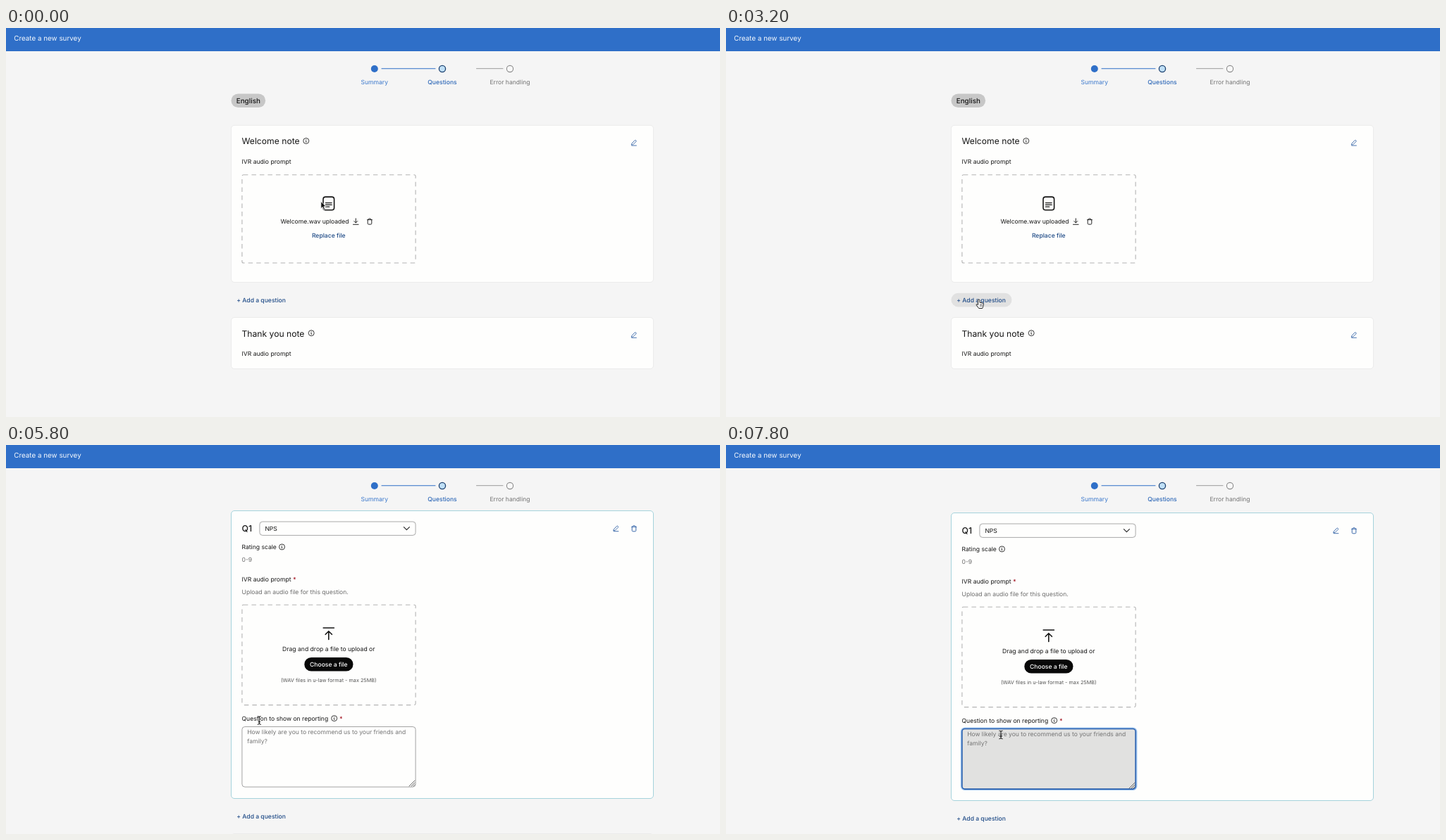
An HTML page that plays this animation: 1013x553 px, repeating every 8 s.

```html
<!DOCTYPE html>
<html lang="en">
<head>
<meta charset="utf-8">
<title>Create a new survey</title>
<style>
  html, body { margin: 0; width: 100%; height: 100%; overflow: hidden; background: #f5f5f5; }
  svg { display: block; width: 1013px; height: 553px; }
  text { font: 8.58px Inter, "Liberation Sans", sans-serif; fill: #161616; text-rendering: geometricPrecision; white-space: pre; }
  .line { fill: none; stroke-linecap: round; stroke-linejoin: round; }
</style>
</head>
<body>
<svg id="stage" viewBox="0 0 1013 553"></svg>
<script>
const BLUE = '#2f6fc8', LINK = '#1f4b87', GREY = '#6c6c6c', CARD = '#fefefd';

// Drawing helpers, each returning SVG markup
const text = (x, y, s, { size = 8.58, fill = '#161616', weight = 400, mid = false } = {}) =>
  `<text x="${x}" y="${y}" style="font-size:${size}px;font-weight:${weight};fill:${fill}"` +
  `${mid ? ' text-anchor="middle"' : ''}>${s}</text>`;
const box = (x, y, w, h, r, fill, stroke = 'none', more = '') =>
  `<rect x="${x}" y="${y}" width="${w}" height="${h}" rx="${r}" fill="${fill}" stroke="${stroke}" ${more}/>`;
const dot = (x, y, r, fill, stroke = 'none', width = 1) =>
  `<circle cx="${x}" cy="${y}" r="${r}" fill="${fill}" stroke="${stroke}" stroke-width="${width}"/>`;
const path = (x, y, d, stroke = '#222', width = 1) =>
  `<path class="line" transform="translate(${x} ${y})" d="${d}" stroke="${stroke}" stroke-width="${width}"/>`;
const group = (id, body) => `<g id="${id}">${body}</g>`;

const info = (x, y) => dot(x, y, 4, 'none', '#222', 0.9) + path(x, y, 'M-.6-.2H0V2M0-2v.2', '#222', 0.9);
const pencil = (x, y) => path(x, y,
  'M-3.3 4H3.4M-3 1L.9-3.2q.9-.8 1.8 0t0 1.8L-1.2 2.5-3.4 3z', '#3565a8', 0.9);
const trash = (x, y, color) => path(x, y,
  'M-3.3-2.4H3.3M-1.6-2.5v-.7q0-.8.8-.8H.8q.8 0 .8.8v.7M-2.8-2.4V2.8q0 1.3 1.3 1.3h3q1.3 0 1.3-1.3V-2.4', color, 1);
const dashed = (y, h) => box(334.9, y, 246.2, h, 2, 'none', '#b4b4b4', 'stroke-width="1.1" stroke-dasharray="6.5 5"');
const card = (y, h, stroke = '#ebebeb') => box(319.5, y, 599, h, 4.5, CARD, stroke);
const noteHead = (y, title, infoX) =>
  text(334.5, y + 27, title, { size: 12.15 }) + info(infoX, y + 22.2) +
  pencil(891, y + 24.8) + text(334.5, y + 54.6, 'IVR audio prompt');

const header = box(0, 0, 1013, 33, 0, BLUE) +
  text(11.3, 18, 'Create a new survey', { size: 9.84, fill: '#f4f8fd' });

const steps =
  dot(522.8, 58, 5, BLUE) + path(533, 57.7, 'M0 0H76', BLUE, 1.1) +
  dot(619, 58, 4.6, '#bfdff6', '#1d416f', 1.3) +
  path(667.5, 57.7, 'M0 0H37.5', '#9a9a9a') + dot(715, 58, 4.6, '#f8f8f8', '#8b8b8b', 1.1) +
  text(522.7, 80, 'Summary', { fill: '#3b78cc', mid: true }) +
  text(619, 80, 'Questions', { fill: '#2f69b8', weight: 500, mid: true }) +
  text(715, 80, 'Error handling', { fill: '#737373', mid: true });

const welcome =
  box(319.5, 93.5, 48.6, 19.6, 9.8, '#c7c7c7') +
  text(343.8, 107, 'English', { size: 9.84, weight: 500, mid: true }) +
  card(138.3, 223.2) + noteHead(138.3, 'Welcome note', 425.8) + dashed(208.8, 125.2) +
  path(457.8, 249.4, 'M-4.5-9.3h9q3.3 0 3.3 3.3v12q0 3.3-3.3 3.3h-9q-3.3 0-3.3-3.3v-12q0-3.3 3.3-3.3z', '#151515', 1.6) +
  path(457.8, 249.4, 'M-4.4-.8H4.4M-4.4 2H4.4M-4.4 4.8H1', '#151515', 1.2) +
  text(389.6, 278.2, 'Welcome.wav uploaded') +
  path(496.3, 275, 'M0-4.2V1.8M-2.5-.5L0 2 2.5-.5M-3.8 4.3H3.8') + trash(516, 275, '#222') +
  text(457.8, 297.9, 'Replace file', { fill: LINK, weight: 500, mid: true });

const question =
  card(376.5, 409, '#a5d3dc') +
  text(334.5, 406.3, 'Q1', { size: 12.27, weight: 500 }) +
  box(359.9, 392, 221.2, 19.4, 4, CARD, '#a9a9a9') + text(367.4, 404.8, 'NPS') +
  path(568.4, 401.7, 'M-4-2L0 2 4-2', '#222', 1.1) + pencil(865.5, 401.7) + trash(891, 401.7, '#3565a8') +
  text(334.5, 431.1, 'Rating scale') + info(391.5, 427.9) +
  text(334.5, 449, '0-9', { fill: GREY }) +
  text(334.5, 476.7, 'IVR audio prompt <tspan fill="#a8202c" style="font-weight:600">*</tspan>') +
  text(334.5, 494.8, 'Upload an audio file for this question.', { fill: GREY }) +
  dashed(510.2, 142.4) +
  path(457.8, 543, 'M-7.6 0H7.6M0 16.5V5M-4.6 9.3L0 4.7 4.6 9.3', '#151515', 1.6) +
  text(457.8, 576.4, 'Drag and drop a file to upload or', { mid: true }) +
  box(423.3, 585, 69.2, 19.6, 9.8, '#080808') +
  text(457.8, 597.9, 'Choose a file', { fill: '#fff', weight: 500, mid: true }) +
  text(457.8, 620, '(WAV files in u-law format - max 25MB)', { size: 7.28, fill: '#555', mid: true }) +
  text(334.5, 674.8, 'Question to show on reporting') + info(465.7, 671.6) +
  text(473, 674.8, '*', { fill: '#a8202c', weight: 600 }) +
  `<g id="halo">${box(333.6, 682.3, 249, 87.8, 5, 'none', '#9cc3ee', 'stroke-width="1.6"')}</g>` +
  box(334.9, 683.5, 246.2, 85.6, 4, CARD, '#a3a3a3', 'id="area"') +
  path(580, 768, 'M-8 0L0-8M-5 0L0-5M-2.3 0L0-2.3', '#555', 0.9) +
  text(342.2, 694.3, 'How likely are you to recommend us to your friends and', { size: 8.54, fill: '#747474' }) +
  text(342.2, 707.2, 'family?', { size: 8.54, fill: '#747474' });

const tail =
  box(319.5, 376.8, 86, 19.6, 9.8, '#e1e1e1', 'none', 'id="hover"') +
  text(327.3, 389.8, '+ Add a question', { fill: LINK, weight: 500 }) +
  card(411.5, 73) + noteHead(411.5, 'Thank you note', 433.2);

// Pointers have their hot spot at 0,0
const pointers = {
  arrow: '<path d="M0 0V10.2L2.4 8 4.1 11.8 5.9 11 4.2 7.3H7.3z" fill="#111" stroke="#fff" stroke-width=".8"/>',
  hand: '<path d="M-1.7 1.2q0-1.4 1.1-1.4T.7 1.2V4.2L5 5.2q1.2.4 1 1.8L5.3 10.5 4.5 12.5H-.6L-4 8q-.7-1.2.4-1.5.8-.1 1.9 1.2z" ' +
    'fill="#fff" stroke="#222" stroke-width="1"/><path class="line" d="M1 7.3H4M1 9.2H4" stroke="#222" stroke-width=".7"/>',
  beam: '<path class="line" d="M-2.2-5.2Q0-5 0-3.8 0-5 2.2-5.2M0-4V5M-2.2 6.2Q0 6 0 4.8 0 6 2.2 6.2M-1.3 2.6H1.3" stroke="#222" stroke-width="1.1"/>'
};

const stage = document.getElementById('stage');
stage.innerHTML =
  '<clipPath id="view"><rect y="93" width="1013" height="460"/></clipPath>' +
  box(0, 0, 1013, 553, 0, '#f5f5f5') + header + steps +
  `<g clip-path="url(#view)">${group('page', welcome + group('question', question) + group('tail', tail))}</g>` +
  group('pointer', Object.entries(pointers).map(([id, body]) => group(id, body)).join(''));

const el = id => document.getElementById(id);
const show = (id, on) => el(id).setAttribute('visibility', on ? 'visible' : 'hidden');
const move = (id, x, y) => el(id).setAttribute('transform', `translate(${x} ${y})`);

// Each key is [time, ...values]; values blend linearly between keys
const scrollKeys = [[4400, 0], [4600, 70], [4800, 190], [5000, 265], [5200, 277], [5400, 282],
  [5600, 283], [6200, 283], [6600, 280]];
const pointerKeys = [[400, 446.8, 246.5], [600, 443, 254], [800, 425, 284], [1000, 398, 328],
  [1200, 374, 366], [1400, 362, 386], [1600, 359.3, 391], [6200, 359.3, 391], [6400, 375, 401], [6600, 390, 411.5]];

function at(keys, t) {
  const next = keys.findIndex(k => k[0] > t);
  if (next < 1) return (next ? keys[keys.length - 1] : keys[0]).slice(1);
  const a = keys[next - 1], b = keys[next], u = (t - a[0]) / (b[0] - a[0]);
  return a.slice(1).map((v, i) => v + (b[i + 1] - v) * u);
}

function draw(now) {
  const t = Math.floor(now % 8000 / 200) * 200;
  const added = t >= 3800, focused = t >= 7000;
  const [scroll] = at(scrollKeys, t), [x, y] = at(pointerKeys, t);
  const onButton = !added && x > 320 && x < 405 && y > 377 && y < 397;
  const onArea = added && y > 683.5 - scroll;
  const kind = onButton ? 'hand' : t >= 5200 ? 'beam' : 'arrow';

  move('page', 0, -scroll);
  move('tail', 0, added ? 424 : 0);
  show('question', added);
  show('halo', focused);
  show('hover', onButton);
  const area = el('area');
  area.setAttribute('fill', focused ? '#e1e1e0' : onArea ? '#ebebef' : CARD);
  area.setAttribute('stroke', focused ? '#285fae' : '#a3a3a3');
  area.setAttribute('stroke-width', focused ? 1.6 : 1);

  move('pointer', x, kind === 'hand' ? y - 5 : y);
  for (const id in pointers) show(id, id === kind);
  requestAnimationFrame(draw);
}
requestAnimationFrame(draw);
</script>
</body>
</html>
```
